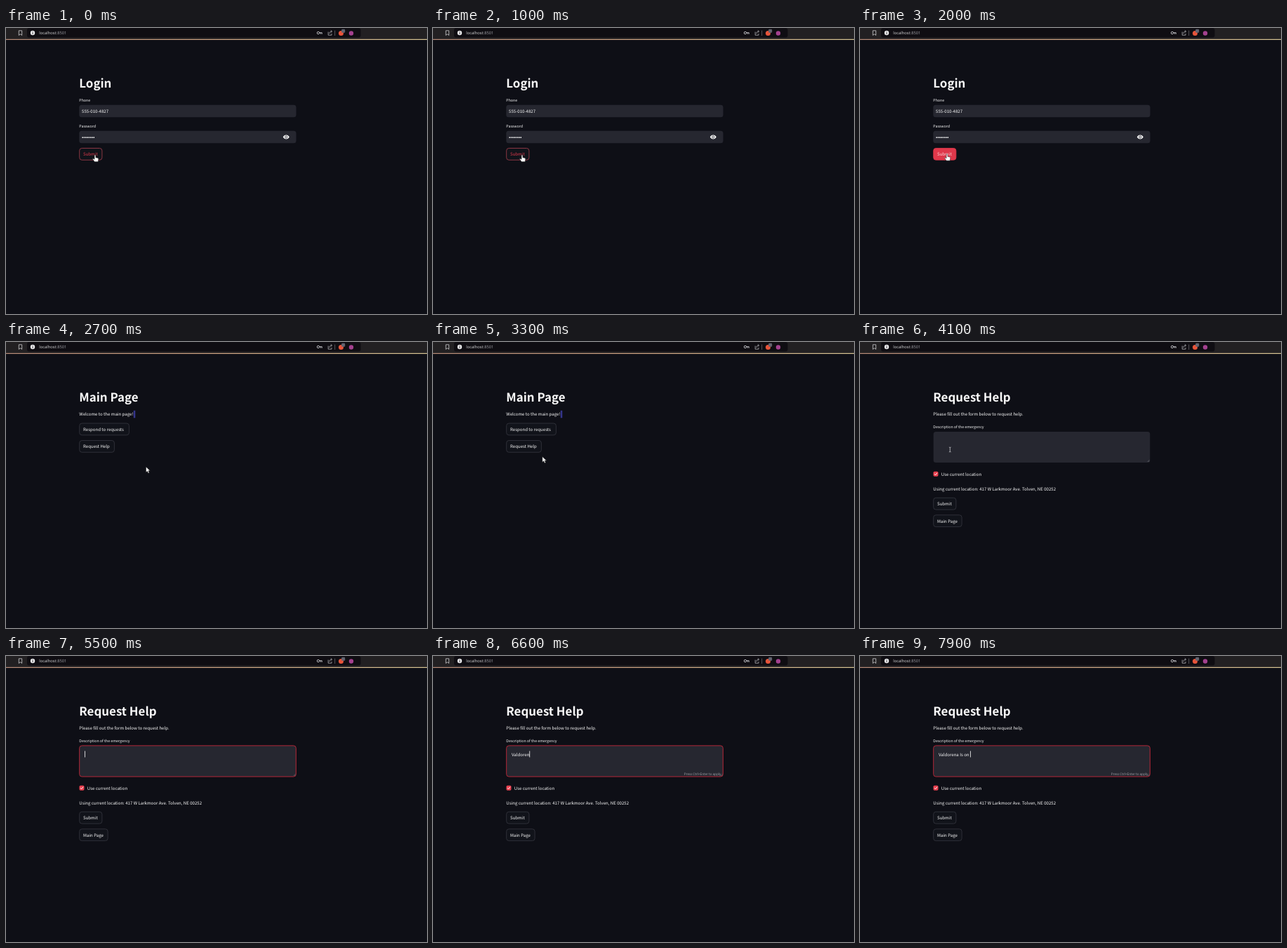
Animation of 600x408 px, one loop 8 s. Source, as an HTML page:

```html
<!DOCTYPE html>
<html lang="en">
<head>
<meta charset="utf-8">
<title>Login and request form</title>
<style>
  html, body { margin: 0; width: 100%; height: 100%; overflow: hidden; background: #0e0f16; }
  svg { display: block; width: 600px; height: 408px; }
  text {
    font-family: "Noto Sans CJK JP", "Noto Sans CJK SC", "Noto Sans CJK", "Open Sans", sans-serif;
    font-size: 6.1px; fill: #fafafa; white-space: pre; text-rendering: geometricPrecision;
  }
  .title { font-size: 16.9px; font-weight: 700; }
  .label { font-size: 5.3px; }
  .hint { font-size: 4.6px; fill: #a3a4aa; text-anchor: end; }
  .url { font-family: "Open Sans", "Noto Sans", sans-serif; font-size: 5.8px; fill: #d8d8da; }
  .field { fill: #262730; }
  .btn rect { fill: #11131a; stroke: #363840; stroke-width: .8; }
  .btn.hover rect { stroke: #a8414e; }
  .btn.hover text { fill: #e0394c; }
  .btn.down rect { fill: #df384b; stroke: #df384b; }
  .btn.down text { fill: #fbd9dc; }
  .focus { stroke: #b32638; stroke-width: 1; }
</style>
</head>
<body>
<svg viewBox="0 0 600 408">
  <defs>
    <linearGradient id="strip">
      <stop offset="0" stop-color="#b88c78"/>
      <stop offset=".5" stop-color="#d0a583"/>
      <stop offset="1" stop-color="#d8c593"/>
    </linearGradient>
  </defs>
  <rect width="600" height="408" fill="#0e0f16"/>

  <g id="toolbar">
    <rect width="600" height="16" fill="#222022"/>
    <rect x="30" y="0" width="475.500" height="13.500" rx="3" fill="#0f0d12"/>
    <rect y="15.800" width="600" height="1.200" fill="url(#strip)"/>
    <path d="M18.300 3.800h4.400v6.600l-2.200-1.700-2.200 1.700z" fill="none" stroke="#d0d0d2" stroke-width=".8"/>
    <circle cx="38" cy="7" r="3.200" fill="#e8e8ea"/>
    <path d="M38 6.500v2.300M38 4.900v.8" stroke="#18161a" stroke-width=".9"/>
    <text class="url" x="47.300" y="9.100">localhost<tspan fill="#a0a0a6">:8501</tspan></text>
    <g fill="none" stroke="#c8c8cc" stroke-width=".9">
      <circle cx="445" cy="7" r="1.700"/>
      <path d="M446.700 6.700h3.600v2M448.500 6.700v1.900"/>
      <path d="M459.200 5.500v4.700h4.800V8M461 8.200c0-2.300 1-3.300 3.400-3.300M462.900 3.300l1.700 1.600-1.700 1.600" stroke-width=".7"/>
      <path d="M468.700 3.500v7.500" stroke="#77757b" stroke-width=".7"/>
    </g>
    <circle cx="477.500" cy="7.500" r="3.500" fill="#e8543a"/>
    <rect x="478.200" y="1.800" width="5" height="5" rx="1.200" fill="#62636f"/>
    <circle cx="492" cy="7.500" r="3.200" fill="#a3418f"/>
  </g>

  <g id="login">
    <text class="title" x="104.300" y="85.200">Login</text>
    <text class="label" x="104.300" y="104.800">Phone</text>
    <rect class="field" x="104.300" y="109.800" width="309.200" height="17.400" rx="3.500"/>
    <text x="108" y="121">555-010-4827</text>
    <text class="label" x="104.300" y="141.800">Password</text>
    <rect class="field" x="104.300" y="146.800" width="309.200" height="17.400" rx="3.500"/>
    <path d="M109.200 156.200h16.800" stroke="#fafafa" stroke-width="1.700" stroke-linecap="round" stroke-dasharray="0 2.300"/>
    <path d="M394.800 155.500c2-4 7-4 9 0c-2 4-7 4-9 0z" fill="#fafafa"/>
    <circle cx="399.300" cy="155.500" r="1.600" fill="#fafafa" stroke="#262730" stroke-width=".9"/>
  </g>

  <g id="main">
    <text class="title" x="104.300" y="85.200">Main Page</text>
    <rect x="181.800" y="97.800" width="2.500" height="10.500" fill="#34358c"/>
    <text x="104.300" y="105.300">Welcome to the main page!</text>
  </g>

  <g id="help">
    <text class="title" x="104.300" y="85.200">Request Help</text>
    <text x="104.300" y="105.300">Please fill out the form below to request help.</text>
    <text class="label" x="104.300" y="122.900">Description of the emergency</text>
    <rect id="area" class="field" x="104.700" y="127.900" width="308.600" height="44.200" rx="3.500"/>
    <path d="M409.700 171l2.800-2.800M411.300 171l1.200-1.200" stroke="#85868c" stroke-width=".5"/>
    <text id="typed" x="112" y="142.500"></text>
    <rect id="caret" y="135.500" width=".8" height="9" fill="#fafafa"/>
    <text id="hint" class="hint" x="410.500" y="169.900">Press Ctrl+Enter to apply</text>
    <rect x="104.500" y="184.700" width="7" height="7" rx="1.700" fill="#e8404f"/>
    <path d="M106.100 188.200l1.400 1.500 2.500-2.900" fill="none" stroke="#fff" stroke-width="1"/>
    <text x="115.800" y="190.600">Use current location</text>
    <text x="104.300" y="211.700">Using current location: 417 W Larkmoor Ave. Tolven, NE 00252</text>
  </g>

  <g id="cursor" stroke-linejoin="round">
    <path id="arrow" d="M0 0v8l1.900-1.700 1.300 2.900 1.500-.7-1.300-2.800h2.500z" fill="#fff" stroke="#111" stroke-width=".5"/>
    <path id="hand" d="M-.9.800Q0-.6.900.8v3l3 .8q1 .4.900 1.400l-.6 3.800h-5l-2.500-3.500q-.3-1.300 1-.9l1.400.9z" fill="#fff" stroke="#222" stroke-width=".5"/>
    <path id="beam" d="M-1.400-3.400Q0-3.400 0-2.600Q0-3.400 1.400-3.400M0-2.600v5.200M-1.400 3.400Q0 3.400 0 2.600Q0 3.400 1.400 3.400" fill="none" stroke="#c4c4c8" stroke-width=".8"/>
  </g>
</svg>
<script>
const LOOP = 8000, STEP = 100;
const PRESSED = 1900, MAIN = 2300, HELP = 4100, FOCUS = 4500;
const MESSAGE = "Valdorena Is on ";
const KEYS = [5700, 5900, 6000, 6100, 6200, 6400, 6500, 6600,
              6800, 6900, 7100, 7300, 7400, 7600, 7700, 7800];

// time, x, y of the pointer tip
const PATH = [
  [0, 127, 181], [1000, 127, 181], [1500, 124, 179.5], [2300, 124, 179.5],
  [2600, 199.5, 178], [2900, 199.5, 178], [3600, 127.5, 154],
  [4000, 127.5, 153.5], [4100, 128.3, 153.5], [4600, 128.3, 153.5],
  [5200, -10, 170], [LOOP, -10, 170]
];

const el = id => document.getElementById(id);
const show = (node, on) => node.style.display = on ? "" : "none";

function button(parent, y, width, label) {
  const ns = "http://www.w3.org/2000/svg";
  const add = (to, tag, attrs) => {
    const node = document.createElementNS(ns, tag);
    for (const key in attrs) node.setAttribute(key, attrs[key]);
    return to.appendChild(node);
  };
  const group = add(el(parent), "g", { class: "btn" });
  add(group, "rect", { x: 104.7, y: y - 8.4, width: width - .8, height: 16.8, rx: 3.5 });
  add(group, "text", { x: 110, y: y + 2.3 }).textContent = label;
  return group;
}

const login = button("login", 179.9, 33, "Submit");
button("main", 124.4, 71.5, "Respond to requests");
const request = button("main", 148.9, 50.5, "Request Help");
button("help", 230.7, 33, "Submit");
button("help", 255.2, 41.2, "Main Page");

function pointer(t) {
  const i = PATH.findIndex(p => p[0] > t);
  const [t0, x0, y0] = PATH[i - 1], [t1, x1, y1] = PATH[i];
  const k = (t - t0) / (t1 - t0), e = k * k * (3 - 2 * k);
  return [x0 + (x1 - x0) * e, y0 + (y1 - y0) * e];
}

function setButton(node, hover, down) {
  node.setAttribute("class", "btn" + (down ? " down" : hover ? " hover" : ""));
}

function render(t) {
  const page = t < MAIN ? "login" : t < HELP ? "main" : "help";
  for (const id of ["login", "main", "help"]) show(el(id), id === page);

  const [x, y] = pointer(t);
  const onRequest = page === "main" && x < 155 && y < 157;
  setButton(login, true, t >= PRESSED && t < PRESSED + 200);
  setButton(request, onRequest, t >= 3900);

  const inArea = page === "help" && x > 104;
  const shape = page === "login" || onRequest ? "hand" : inArea ? "beam" : "arrow";
  for (const id of ["hand", "beam", "arrow"]) show(el(id), id === shape);
  el("cursor").setAttribute("transform", `translate(${x} ${y})`);

  const count = KEYS.filter(k => k <= t).length;
  const typed = el("typed");
  typed.textContent = MESSAGE.slice(0, count);
  el("area").classList.toggle("focus", t >= FOCUS);
  show(el("hint"), count > 0);
  const caretOn = count > 0 || (t >= FOCUS && (t - FOCUS) % 1000 < 500);
  show(el("caret"), caretOn);
  if (page === "help") {
    el("caret").setAttribute("x", 112 + (count ? typed.getComputedTextLength() : 0));
  }
}

function tick() {
  const t = performance.now() % LOOP;
  render(Math.floor(t / STEP) * STEP);
  requestAnimationFrame(tick);
}
tick();
</script>
</body>
</html>
```
